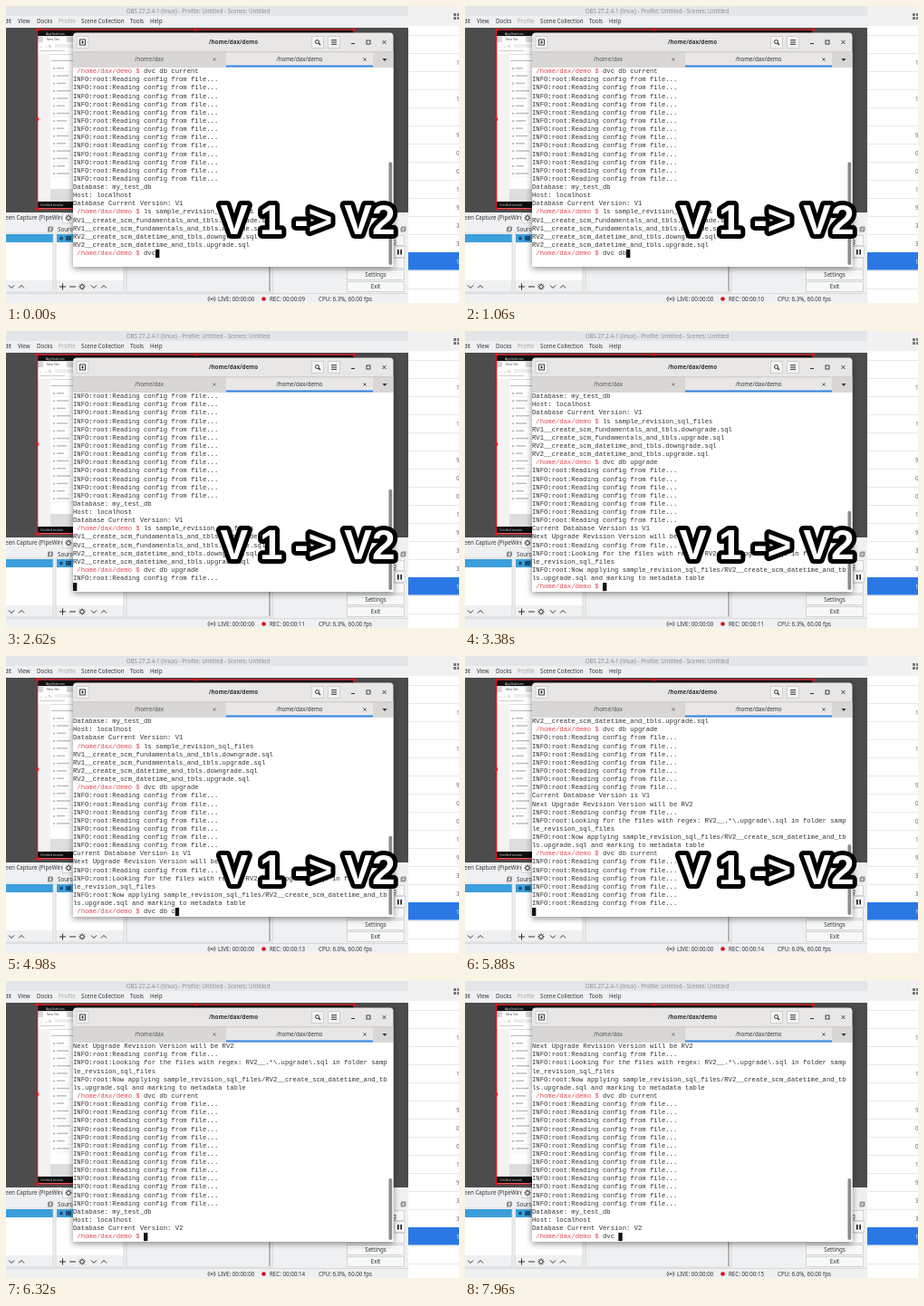
An HTML page with a canvas for the animation above (8000 ms loop, 500 by 328 pixels).

```html
<!DOCTYPE html>
<html lang="en">
<head>
<meta charset="utf-8">
<title>Database upgrade demo</title>
<style>
html, body { margin: 0; width: 100%; height: 100%; overflow: hidden; }
canvas { display: block; }
</style>
</head>
<body>
<canvas id="stage" width="500" height="328"></canvas>
<script>
const ctx = document.getElementById('stage').getContext('2d');
const LOOP = 8000, COLS = 80, ROWS = 24, CHAR_W = 4.335, ROW_H = 9.13;
const HOME = '/home/dax', PROMPT = ` ${HOME}/demo $ `;
const READING = 'INFO:root:Reading config from file...\n';
const FILES = ['RV1__create_scm_fundamentals_and_tbls', 'RV2__create_scm_datetime_and_tbls'];

const status = version =>
  ['Database: my_test_db\n', 'Host: localhost\n', `Database Current Version: ${version}\n`];
const reading = count => Array(count).fill(READING);

// Terminal session: a starting log, then text appended at given times.
const startLog = PROMPT + 'dvc db current\n' + reading(13).join('') + status('V1').join('') +
  PROMPT + 'ls sample_revision_sql_files\n' +
  FILES.map(f => `${f}.downgrade.sql\n${f}.upgrade.sql\n`).join('') + PROMPT + 'dvc';
const events = [];
const type = (text, times) => [...text].forEach((c, i) => events.push([times[i], c]));
const print = (start, lines) => lines.forEach((s, i) => events.push([start + i * 27, s]));

type(' db upgrade\n', [300, 540, 1000, 1240, 1560, 1720, 1840, 1960, 2080, 2220, 2320, 2460]);
print(2620, [
  ...reading(7),
  'Current Database Version is V1\n',
  'Next Upgrade Revision Version will be RV2\n',
  READING,
  'INFO:root:Looking for the files with regex: RV2__.*\\.upgrade\\.sql in folder sample_revision_sql_files\n',
  `INFO:root:Now applying sample_revision_sql_files/${FILES[1]}.upgrade.sql and marking to metadata table\n`
]);
print(3100, [PROMPT]);
type('dvc db current\n',
  [3440, 3660, 3940, 4120, 4360, 4500, 4660, 4980, 5060, 5140, 5220, 5300, 5380, 5460, 5600]);
print(5740, [...reading(13), ...status('V2')]);
print(6320, [PROMPT]);
type('dvc ', [6530, 7680, 7720, 7960]);

function rect(x, y, w, h, color) {
  ctx.fillStyle = color;
  ctx.fillRect(x, y, w, h);
}

function frame(x, y, w, h, color, width = 1) {
  ctx.strokeStyle = color;
  ctx.lineWidth = width;
  ctx.strokeRect(x, y, w, h);
}

function label(text, x, y, { color = '#303336', size = 6.2, align = 'left', weight = 400 } = {}) {
  ctx.font = `${weight} ${size}px "Noto Sans", sans-serif`;
  ctx.textAlign = align;
  ctx.fillStyle = color;
  ctx.fillText(text, x, y);
}

function path(points, color = '#333', width = 1) {
  ctx.beginPath();
  points.forEach(([x, y]) => ctx.lineTo(x, y));
  ctx.strokeStyle = color;
  ctx.lineWidth = width;
  ctx.stroke();
}

function circle(x, y, r, color, hollow) {
  ctx.beginPath();
  ctx.arc(x, y, r, 0, 7);
  ctx.fillStyle = ctx.strokeStyle = color;
  ctx.lineWidth = 1;
  hollow ? ctx.stroke() : ctx.fill();
}

const chevron = (x, y, dir) => path([[x - 3, y - 1.5 * dir], [x, y + 1.5 * dir], [x + 3, y - 1.5 * dir]]);

function cross(x, y, r, color) {
  path([[x - r, y - r], [x + r, y + r]], color, 0.9);
  path([[x + r, y - r], [x - r, y + r]], color, 0.9);
}

function gear(x, y) {
  circle(x, y, 2.2, '#333', true);
  for (let a = 0; a < 6.2; a += Math.PI / 4) {
    const c = Math.cos(a), s = Math.sin(a);
    path([[x + 2.2 * c, y + 2.2 * s], [x + 3.5 * c, y + 3.5 * s]]);
  }
}

function button(x, y, w, h, text = '') {
  rect(x, y, w, h, '#f7f8f8');
  frame(x + 0.5, y + 0.5, w - 1, h - 1, '#c3c5c7', 0.7);
  label(text, x + w / 2, y + h / 2 + 2.2, { align: 'center' });
}

function drawPreview() {
  rect(0, 24, 444, 204, '#4c4c4c');
  rect(35, 27, 349, 197, '#dedede');
  rect(35, 27, 349, 6, '#111');
  label('Applications', 44, 31.8, { color: '#ddd', size: 3.6 });
  rect(35, 33, 349, 7, '#d5d8dc');
  rect(41, 34, 26, 6, '#fff');
  label('New Tab', 45, 38.4, { color: '#555', size: 3.4 });
  rect(35, 40, 349, 13, '#fff');
  label('← → ↻', 37, 45.5, { color: '#777', size: 4 });
  rect(54, 42, 60, 4, '#eceef0');
  rect(37, 49, 28, 1, '#ccc');
  rect(35, 53, 14, 163, '#f3f3f3');
  rect(49, 54, 50, 148, '#fff');
  rect(50, 60, 50, 1, '#bbb');
  for (let i = 0; i < 15; i++) {
    const y = 68 + i * 8.3;
    rect(52, y, 2, 2, '#bbb');
    rect(56, y, 8 + (i * 5) % 8, 1.5, '#bdbdbd');
    rect(50, y + 4.5, 24, 0.5, '#e8e8e8');
  }
  rect(35, 216, 349, 7, '#0c0c0c');
  label('Untitled session', 38, 221, { color: '#ccc', size: 3.4 });
  frame(34.7, 26, 349.3, 198, '#e8101c', 1.2);
  for (const x of [34.7, 209, 384])
    for (const y of [26, 125, 224]) rect(x - 1.5, y - 1.5, 3, 3, '#f0101c');
}

function drawRecorder(t) {
  rect(0, 0, 444, 328, '#eff0f1');
  rect(0, 0, 444, 11, '#e3e5e7');
  label('OBS 27.2.4-1 (linux) - Profile: Untitled - Scenes: Untitled', 212, 8,
    { align: 'center', color: '#8b8e91' });
  const menu = [['Edit', -5], ['View', 13], ['Docks', 34], ['Profile', 58],
    ['Scene Collection', 83], ['Tools', 137], ['Help', 159]];
  for (const [text, x] of menu) label(text, x, 19.3, { color: text === 'Profile' ? '#a6a8aa' : '#303336' });
  drawPreview();

  label('een Capture (PipeWire)', -1, 236.3);
  rect(62, 228, 14, 12, '#f7f8f8');
  frame(62.5, 228.5, 14, 11, '#c3c5c7', 0.7);
  gear(69, 234);
  label('Sources', 57, 249.3);
  for (const x of [48.5, 438]) {
    frame(x - 2, 245, 4, 4, '#666', 0.7);
    frame(x - 1, 244, 4, 4, '#666', 0.7);
  }
  rect(0, 251, 52, 52, '#fff');
  rect(0, 252, 52, 9, '#3b9fdc');
  rect(55, 251, 75, 52, '#fff');
  rect(56, 252, 74, 9, '#3b9fdc');
  circle(61, 256.5, 2, '#1f4f74');
  rect(66, 254, 6, 5, '#1f4f74');
  frame(-1, 251, 53, 65, '#c9cbcd', 0.7);
  frame(55, 251, 75, 65, '#c9cbcd', 0.7);
  frame(133, 251, 161, 65, '#c9cbcd', 0.7);
  rect(290, 288, 2, 27, '#b4b6b8');
  chevron(6, 310, 1);
  chevron(17, 310, -1);
  path([[59, 310], [66, 310]]);
  path([[62.5, 306.5], [62.5, 313.5]]);
  path([[70, 310], [77, 310]]);
  gear(84, 310);
  chevron(97, 310, 1);
  chevron(108, 310, -1);

  button(376, 253, 64, 12);
  label('g', 427, 261.5);
  button(428, 265, 13, 13);
  rect(432, 269, 1.7, 5.5, '#222');
  rect(435.3, 269, 1.7, 5.5, '#222');
  button(376, 278, 64, 12);
  button(376, 291, 64, 12, 'Settings');
  button(376, 304, 64, 12, 'Exit');

  rect(0, 317, 444, 0.7, '#d0d2d4');
  circle(227, 323.5, 1, '#333');
  for (const dir of [0, Math.PI])
    for (const r of [2.5, 4]) {
      ctx.beginPath();
      ctx.arc(227, 323.5, r, dir - 0.8, dir + 0.8);
      ctx.strokeStyle = '#444';
      ctx.lineWidth = 0.7;
      ctx.stroke();
    }
  const seconds = 9 + Math.floor((t + 140) / 1200);
  label('LIVE: 00:00:00', 234, 325.8);
  circle(284.5, 323.5, 2.3, '#d8141c');
  label('REC: 00:00:' + String(seconds).padStart(2, '0'), 291, 325.8);
  label(`CPU: ${t < 3440 ? '6.3' : '6.0'}%, 60.00 fps`, 345, 325.8);
}

function drawSidePane() {
  rect(444, 0, 56, 328, '#fff');
  rect(444, 0, 56, 22, '#f1f1f1');
  for (const x of [494, 498])
    for (const y of [8, 12]) rect(x, y, 3, 3, '#777');
  for (let y = 32; y < 328; y += 20) rect(444, y, 56, 0.8, '#e3e3e3');
  rect(444, 272, 56, 19.5, '#2b78e4');
  [...'1 1 90019331'].forEach((digit, i) =>
    label(digit, 497, 64.5 + i * 20, { color: i === 11 ? '#fff' : '#666' }));
}

function drawWindow() {
  ctx.save();
  ctx.shadowColor = 'rgba(0,0,0,.45)';
  ctx.shadowBlur = 7;
  ctx.shadowOffsetY = 2;
  ctx.beginPath();
  ctx.roundRect(74, 29.5, 353.5, 258.5, [4, 4, 0, 0]);
  ctx.fillStyle = '#e8e7e6';
  ctx.fill();
  ctx.restore();
  label(HOME + '/demo', 251, 42.3, { align: 'center', weight: 700 });
  for (const x of [78, 337.5, 355.5]) {
    rect(x, 33.5, 13, 13, '#f4f3f2');
    frame(x, 33.5, 13, 13, '#c8c5c2', 0.7);
  }
  frame(81.5, 37, 6, 6, '#333', 0.9);
  path([[83, 40], [86, 40]]);
  path([[84.5, 38.5], [84.5, 41.5]]);
  circle(343.5, 39.5, 2, '#333', true);
  path([[345, 41], [347, 43]], '#333', 1.2);
  for (const y of [37.7, 40, 42.3]) path([[359, y], [365, y]]);
  path([[381, 41.5], [385, 41.5]]);
  frame(398, 38, 4, 4, '#333', 0.9);
  cross(417.5, 40, 2, '#333');

  rect(74, 50.5, 353.5, 17.5, '#d9d7d5');
  rect(243, 51, 162, 17, '#e8e7e6');
  rect(243, 65.5, 162, 2, '#3584e4');
  rect(74, 50.5, 353.5, 0.7, '#c2bfbc');
  label(HOME, 158, 61.3, { align: 'center', color: '#555' });
  label(HOME + '/demo', 324, 61.3, { align: 'center' });
  cross(230, 59, 1.6, '#777');
  cross(396, 59, 1.6, '#555');
  ctx.beginPath();
  ctx.moveTo(415.5, 58);
  ctx.lineTo(420.5, 58);
  ctx.lineTo(418, 61);
  ctx.fillStyle = '#333';
  ctx.fill();
}

function drawTerminal(t) {
  drawWindow();
  rect(74, 68, 353.5, 220, '#fff');
  const log = events.reduce((text, [at, s]) => t >= at ? text + s : text, startLog);
  const rows = log.split('\n').flatMap(line => line.match(new RegExp(`.{1,${COLS}}`, 'g')) || ['']);
  const scrolled = Math.max(0, rows.length - ROWS);
  const visible = rows.slice(-ROWS);

  ctx.font = `${CHAR_W / 0.6001}px "Liberation Mono", monospace`;
  ctx.textAlign = 'left';
  visible.forEach((row, i) => {
    const y = 68 + i * ROW_H + 6.2;
    const split = row.startsWith(PROMPT) ? PROMPT.length : 0;
    ctx.fillStyle = '#e0474f';
    ctx.fillText(row.slice(0, split), 74, y);
    ctx.fillStyle = '#333';
    ctx.fillText(row.slice(split), 74 + split * CHAR_W, y);
  });
  const last = visible.length - 1;
  rect(74 + visible[last].length * CHAR_W, 68 + last * ROW_H, CHAR_W, ROW_H, '#111');

  const thumb = 5232 / (46 + scrolled);
  ctx.beginPath();
  ctx.roundRect(422.5, 286 - thumb, 3.7, thumb, 1.8);
  ctx.fillStyle = '#8b8b8b';
  ctx.fill();
}

function drawCaption() {
  const text = 'V 1 -> V2';
  ctx.font = 'bold 46px "Liberation Sans", Arial, sans-serif';
  ctx.textAlign = 'center';
  ctx.lineJoin = 'round';
  ctx.lineWidth = 10;
  ctx.strokeStyle = '#000';
  ctx.strokeText(text, 333, 251.5);
  ctx.fillStyle = '#fff';
  ctx.fillText(text, 333, 251.5);
  ctx.lineJoin = 'miter';
}

function draw(now) {
  const t = now % LOOP;
  drawRecorder(t);
  drawSidePane();
  drawTerminal(t);
  if (t < 6320) drawCaption();
  requestAnimationFrame(draw);
}
draw(0);
</script>
</body>
</html>
```
